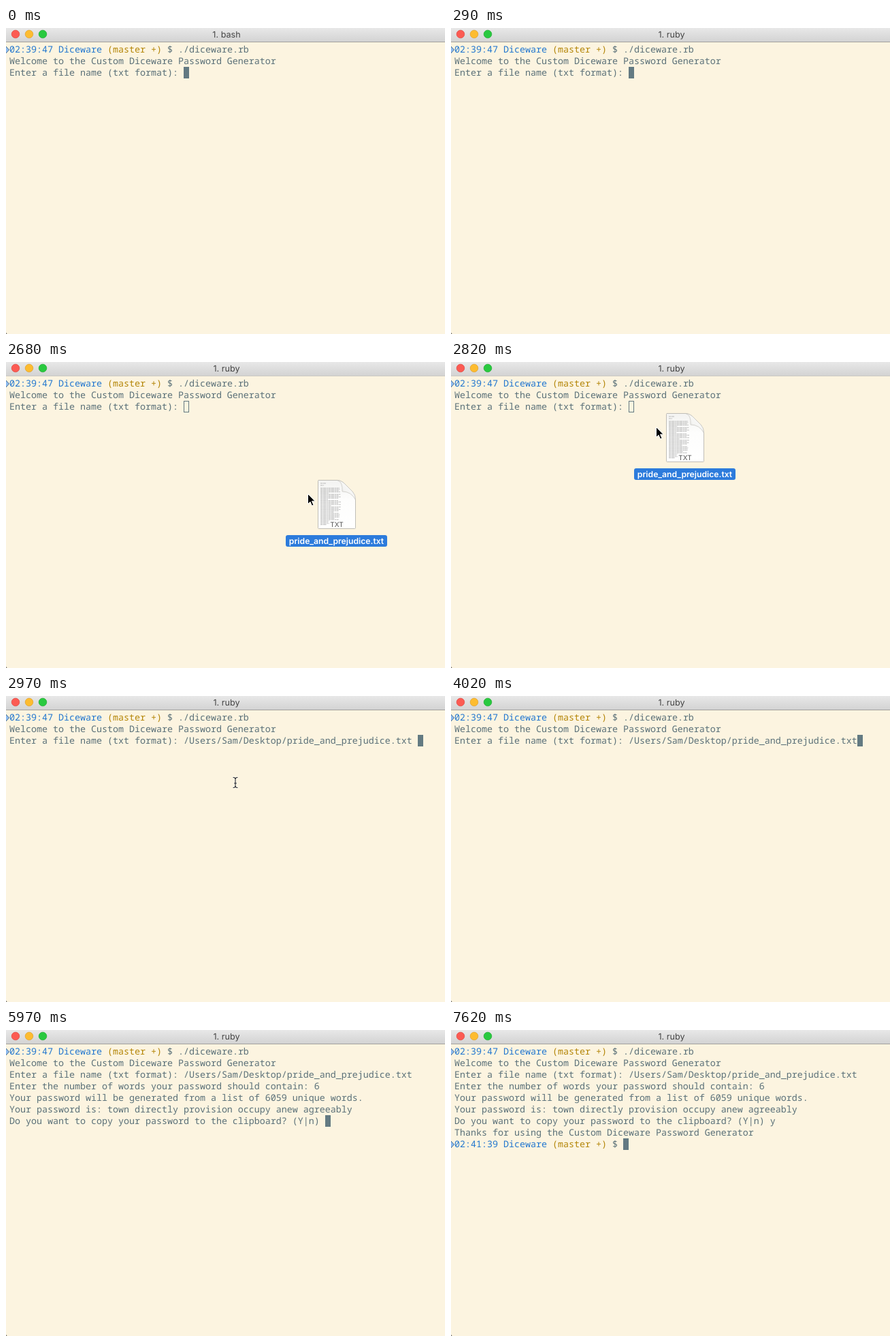
Write an HTML page that moves like this. It is 645 px wide and 449 px high and loops after 8000 ms.

```html
<!DOCTYPE html>
<html lang="en">
<head>
<meta charset="utf-8">
<title>Terminal session</title>
<style>
  html, body { margin: 0; width: 100%; height: 100%; overflow: hidden; background: #fcf4e0; }
  svg { display: block; width: 645px; height: 449px; }
  text { white-space: pre; text-rendering: geometricPrecision; }
  #rows text { font: 13.3333px "Noto Sans Mono", "DejaVu Sans Mono", monospace; fill: #5a7078; }
  #rows .blue { fill: #2277cf; }
  #rows .gold { fill: #b48608; }
  #title { font: 12.6px Inter, "Open Sans", sans-serif; fill: #454545; text-anchor: middle; }
  #label { font: 600 12.2px Inter, "Open Sans", sans-serif; fill: #fff; text-anchor: middle; }
  #kind { font: 10px Inter, sans-serif; fill: #555; text-anchor: middle; }
</style>
</head>
<body>
<svg viewBox="0 0 645 449" xmlns="http://www.w3.org/2000/svg">
  <defs>
    <linearGradient id="bar" x2="0" y2="1">
      <stop stop-color="#e8e8e8"/><stop offset="1" stop-color="#d3d3d3"/>
    </linearGradient>
    <linearGradient id="page" x2="0" y2="1">
      <stop stop-color="#f3f3f1"/><stop offset=".4" stop-color="#fdfdfc"/><stop offset="1" stop-color="#fff"/>
    </linearGradient>
    <linearGradient id="fold" x1="1" y1="0" x2="0" y2="1">
      <stop stop-color="#fff"/><stop offset=".55" stop-color="#f4f4f2"/><stop offset="1" stop-color="#cfcfcc"/>
    </linearGradient>
  </defs>

  <rect width="645" height="449" fill="#fcf4e0"/>
  <rect width="645" height="20" fill="url(#bar)"/>
  <rect id="edge" y="20" width="645" height="1"/>
  <g stroke-width=".7">
    <circle cx="14" cy="9" r="5.8" fill="#fc5b53" stroke="#df453f"/>
    <circle cx="34" cy="9" r="5.8" fill="#fdbc30" stroke="#dea02c"/>
    <circle cx="54" cy="9" r="5.8" fill="#29c93f" stroke="#1eab2e"/>
  </g>
  <text id="title" x="324" y="14"></text>
  <path d="M0 446.500V449H2Q.5 448.500 0 446.500" fill="#555"/>

  <g id="rows"></g>
  <rect id="cursor" stroke="#637a82"/>

  <g id="drag">
    <path d="M459 173.500H487Q494 174 500 181L509 190Q513.500 195 513.500 202V243.500Q513.500 244.500 512.500 244.500H459.500Q458.500 244.500 458.500 243.500V174.500Q458.500 173.500 459.500 173.500Z"
      fill="url(#page)" stroke="#b9b7b0" stroke-width=".9"/>
    <path id="print" stroke="#aaa" stroke-width=".8" fill="none"/>
    <path d="M487 173.500Q495 176 494 190Q507 190 513.500 202Q513.500 195 509 190L500 181Q494 174 487 173.500Z"
      fill="url(#fold)" stroke="#c4c3be" stroke-width=".7"/>
    <text id="kind" x="486" y="241.500">TXT</text>
    <rect x="411" y="254" width="149" height="17" rx="3" fill="#2c7bdc"/>
    <text id="label" x="485.500" y="267">pride_and_prejudice.txt</text>
    <path d="M443.500 193.500V208.500L447 205.200L449.500 211L452 210L449.500 204.200H454Z"
      fill="#000" stroke="#fff" stroke-width="1"/>
  </g>

  <g id="beam" fill="none" stroke-linecap="round">
    <path d="M334 119.500Q337 119.500 337 122V132Q337 134.500 334 134.500M340 119.500Q337 119.500 337 122M337 132Q337 134.500 340 134.500M335.500 128H338.500"
      stroke="#fff" stroke-width="2.200"/>
    <path d="M334 119.500Q337 119.500 337 122V132Q337 134.500 334 134.500M340 119.500Q337 119.500 337 122M337 132Q337 134.500 340 134.500M335.500 128H338.500"
      stroke="#222" stroke-width="1.100"/>
  </g>
</svg>

<script>
const LOOP = 8000, LEFT = 5, TOP = 23, CHAR = 8, LINE = 17;
const $ = id => document.getElementById(id);

const prompt = (time, command = '') =>
  `<path d="M0 27L4.500 32L0 37Z" fill="#8fbdf0"/><path d="M0 27L4.500 32L0 37" fill="none" stroke="#3f6187" stroke-width=".9"/>` +
  `<text x="${LEFT}" y="36"><tspan class="blue">${time} Diceware</tspan> ` +
  `<tspan class="gold">(master +)</tspan> $ ${command}</text>`;
const line = text => `<text x="${LEFT}" y="36">${text}</text>`;

// Each row: time of appearance and markup
const rows = [
  [0, 0, prompt('02:39:47', './diceware.rb')],
  [0, 1, line('Welcome to the Custom Diceware Password Generator')],
  [0, 2, line('Enter a file name (txt format): ')],
  [2970, 2, line(' '.repeat(32) + '/Users/Sam/Desktop/pride_and_prejudice.txt')],
  [4320, 3, line('Enter the number of words your password should contain: ')],
  [5370, 3, line(' '.repeat(56) + '6')],
  [5970, 4, line('Your password will be generated from a list of 6059 unique words.')],
  [5970, 5, line('Your password is: town directly provision occupy anew agreeably')],
  [5970, 6, line('Do you want to copy your password to the clipboard? (Y|n) ')],
  [7170, 6, line(' '.repeat(58) + 'y')],
  [7620, 7, line('Thanks for using the Custom Diceware Password Generator')],
  [7620, 8, prompt('02:41:39')]
].map(([start, row, markup]) => {
  const node = document.createElementNS('http://www.w3.org/2000/svg', 'g');
  node.setAttribute('transform', `translate(0 ${row * LINE})`);
  node.innerHTML = markup;
  $('rows').append(node);
  return { start, node };
});

// Step tables: [time, ...values]
const titles = [[0, '1. bash'], [290, '1. ruby']];
const focus = [[0, true], [2390, false], [2970, true]];
const cursorAt = [
  [0, 2, 32], [2970, 2, 75], [4020, 2, 74], [4320, 3, 56], [5370, 3, 57],
  [5820, 4, 0], [5970, 6, 58], [7170, 6, 59], [7620, 8, 31]
];
const dragAt = [[0], [2530, 118, 63], [2680, 0, 0], [2820, -142, -98], [2970]];
const beamAt = [[0], [2970, 0, 0], [3120, 29, 1], [3270]];

const at = (steps, t) => steps.findLast(step => step[0] <= t).slice(1);
const set = (node, attrs) => {
  for (const name in attrs) node.setAttribute(name, attrs[name]);
};
const place = (node, [x, y]) => {
  node.style.display = x === undefined ? 'none' : '';
  if (x !== undefined) set(node, { transform: `translate(${x} ${y})` });
};

// Fine print on the page: two short headings, then ragged paragraphs
let print = 'M462 178h8M462 181h5';
for (let i = 0; i < 30; i++) {
  const width = i % 5 === 4 ? 9 + 12 * Math.abs(Math.sin(i * 7)) : 28 + 2 * Math.sin(i * 3);
  print += `M462 ${185 + i * 1.85}h${(i > 25 ? width / 2.3 : width).toFixed(1)}`;
}
set($('print'), { d: print, 'stroke-dasharray': '3 .6 5 .7 2 .5' });

function draw(t) {
  rows.forEach(({ start, node }) => node.style.display = t < start ? 'none' : '');
  $('title').textContent = at(titles, t)[0];

  const [focused] = at(focus, t);
  $('edge').style.fill = focused ? '#a2a19e' : '#cbc9c3';

  const [row, col] = at(cursorAt, t);
  set($('cursor'), {
    x: LEFT + col * CHAR + .5, y: TOP + row * LINE + .5,
    width: CHAR - 1, height: LINE - 1,
    fill: focused ? '#637a82' : 'none'
  });

  place($('drag'), at(dragAt, t));
  place($('beam'), at(beamAt, t));
}

const begin = performance.now();
function tick() {
  draw((performance.now() - begin) % LOOP);
  requestAnimationFrame(tick);
}
tick();
</script>
</body>
</html>
```
